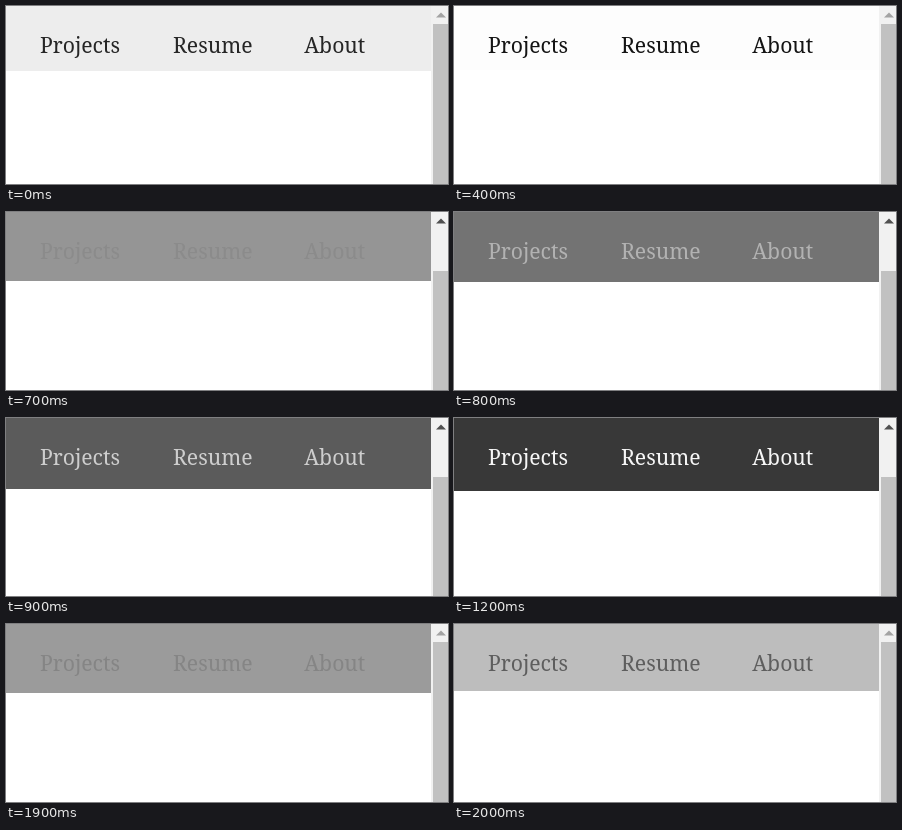
Recreate the animation shown at these times as an HTML page. Size 442x178 px, loop 2100 ms.

```html
<!DOCTYPE html>
<html lang="en">
<head>
<meta charset="utf-8">
<title>Navigation bar fade</title>
<style>
  html, body { margin: 0; width: 100%; height: 100%; overflow: hidden; background: #fff; }
  svg { display: block; }
  text { font: 21.2px "Noto Serif", "Droid Serif", serif; }
</style>
</head>
<body>
<svg width="442" height="178" viewBox="0 0 442 178">
  <rect id="bar" width="425" height="65"/>
  <g id="links">
    <text x="33.9" y="46.6">Projects</text>
    <text x="166.9" y="46.6">Resume</text>
    <text x="298.2" y="46.6">About</text>
  </g>
  <rect x="425" width="17" height="178" fill="#f1f1f1"/>
  <rect id="thumb" x="427" y="18" width="15" height="220" fill="#c1c1c1"/>
  <path id="arrow" d="M430 11.5 L435 6.5 L440 11.5 Z"/>
</svg>
<script>
const LOOP = 2100, STEP = 100, FADE = 1000;
const DARKEN = 400, LIGHTEN = 1600, CARRIED = 660;
// [time, top of the scroll thumb]
const SCROLL = [[0, 18], [500, 41], [600, 59], [1500, 41], [1600, 23], [1700, 18]];

const $ = id => document.getElementById(id);
const mix = (a, b, p) => a + (b - a) * p;
const gray = v => `rgb(${Array(3).fill(Math.round(v))})`;

// CSS "ease": cubic-bezier(.25, .1, .25, 1)
function ease(x) {
  if (x <= 0) return 0;
  if (x >= 1) return 1;
  const curve = (a, b, s) => 3 * a * s * (1 - s) ** 2 + 3 * b * s * s * (1 - s) + s ** 3;
  let lo = 0, hi = 1;
  for (let i = 0; i < 30; i++) {
    const mid = (lo + hi) / 2;
    if (curve(.25, .25, mid) < x) lo = mid; else hi = mid;
  }
  return curve(.1, 1, lo);
}

function darkness(t) {
  if (t < DARKEN) return 1 - ease((t + CARRIED) / FADE);
  if (t < LIGHTEN) return ease((t - DARKEN) / FADE);
  return 1 - ease((t - LIGHTEN) / FADE);
}

function draw(t) {
  const p = darkness(t);
  const top = SCROLL.filter(([at]) => at <= t).pop()[1];
  $("bar").setAttribute("height", Math.round(mix(64.4, 73, p)));
  $("bar").setAttribute("fill", gray(mix(253, 51, p)));
  $("links").setAttribute("fill", gray(mix(20, 252, p)));
  $("thumb").setAttribute("y", top);
  $("arrow").setAttribute("fill", top > 18 ? "#505050" : "#a3a3a3");
}

const start = performance.now();
function tick() {
  const t = (performance.now() - start) % LOOP;
  draw(Math.floor(t / STEP) * STEP);
  requestAnimationFrame(tick);
}
tick();
</script>
</body>
</html>
```
